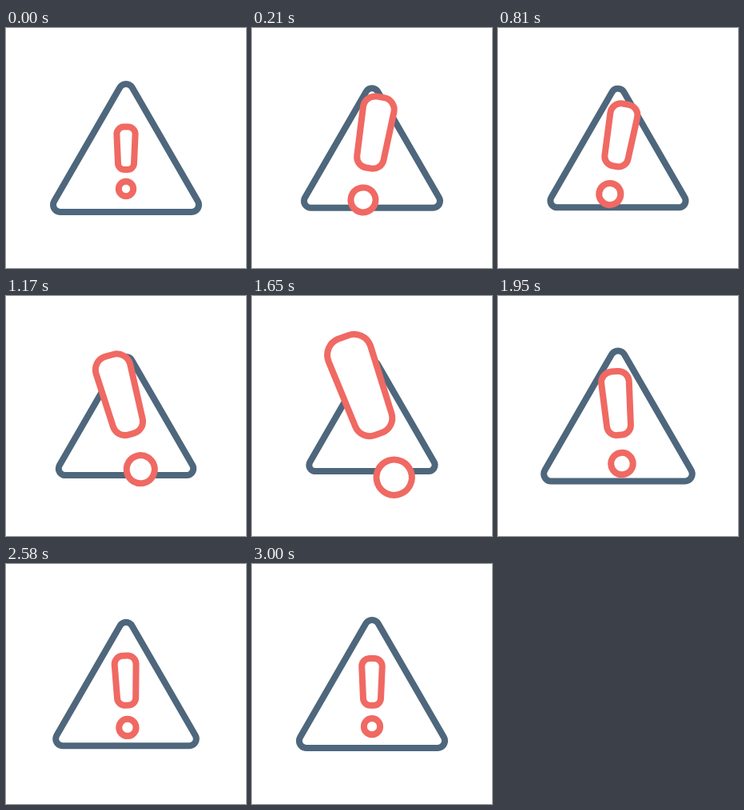
These frames come from a looping animation (300 px wide and 300 px high, 4.53 s). An HTML page with a canvas:

```html
<!DOCTYPE html>
<html lang="en">
<head>
<meta charset="utf-8">
<title>Warning sign</title>
<style>
  html, body { margin: 0; width: 100%; height: 100%; overflow: hidden; background: #fff; }
  canvas { display: block; width: 300px; height: 300px; }
</style>
</head>
<body>
<canvas id="stage" width="300" height="300"></canvas>
<script>
const ctx = document.getElementById('stage').getContext('2d');
const LOOP = 4530, STEP = 30, PI = Math.PI;
const BLUE = '#4e677c', RED = '#f06963';

// Smooth step from 0 to 1 between two times.
function ease(t, start, end) {
  const progress = Math.min(Math.max((t - start) / (end - start), 0), 1);
  return (1 - Math.cos(PI * progress)) / 2;
}

// Rises from 0 to 1 at the peak, then falls back to 0.
const pulse = (t, start, peak, end) => ease(t, start, peak) - ease(t, peak, end);

// The mark swells and swings right, relaxes, swings left, rebounds and settles.
function poseAt(t) {
  const swell = ease(t, 0, 430);
  const relax = pulse(t, 440, 930, 1390);
  const swing = ease(t, 540, 1350);
  const rebound = ease(t, 1620, 2215);
  const sink = ease(t, 2215, 2570);
  const rest = ease(t, 2570, 3000);
  return {
    triangleSize: 1 - .138 * swell + .083 * pulse(t, 420, 970, 1590) + .268 * rebound - .165 * sink + .035 * rest,
    markSize: 1 + 1.42 * swell - 1.1 * relax - 1.58 * rebound + .32 * sink - .06 * rest,
    tilt: 20 * swell - 40 * swing + 26 * rebound - 8 * sink + 2 * rest,
    lift: 3.3 * (relax + rebound - sink)
  };
}

// The path is scaled but its outline keeps the same weight.
function drawShape(color, size, tracePath) {
  ctx.beginPath();
  ctx.save();
  ctx.scale(size, size);
  tracePath();
  ctx.closePath();
  ctx.restore();
  ctx.fillStyle = '#fff';
  ctx.fill();
  ctx.strokeStyle = color;
  ctx.stroke();
}

function triangle() {
  ctx.arc(-82, 71, 9, PI / 2, PI * 7 / 6);
  ctx.arc(0, -71, 9, PI * 7 / 6, PI * 11 / 6);
  ctx.arc(82, 71, 9, -PI / 6, PI / 2);
}

function bar() {
  const taper = .05;
  ctx.arc(-2.6, -17.4, 9, PI - taper, PI * 3 / 2);
  ctx.arc(2.6, -17.4, 9, -PI / 2, taper);
  ctx.arc(2, 19, 8, taper, PI / 2);
  ctx.arc(-2, 19, 8, PI / 2, PI - taper);
}

function dot() {
  ctx.arc(0, 51, 9.2, 0, 2 * PI);
}

function draw(t) {
  const { triangleSize, markSize, tilt, lift } = poseAt(t);
  const pivotY = 29.3;
  ctx.clearRect(0, 0, 300, 300);
  ctx.lineWidth = 8;
  ctx.save();
  ctx.translate(150, 150);
  drawShape(BLUE, triangleSize, triangle);
  ctx.rotate(tilt * PI / 180);
  ctx.translate(0, pivotY * (1 - markSize) - lift);
  drawShape(RED, markSize, bar);
  drawShape(RED, markSize, dot);
  ctx.restore();
}

function tick() {
  const t = performance.now() % LOOP;
  draw(Math.floor(t / STEP) * STEP);
  requestAnimationFrame(tick);
}
tick();
</script>
</body>
</html>
```
